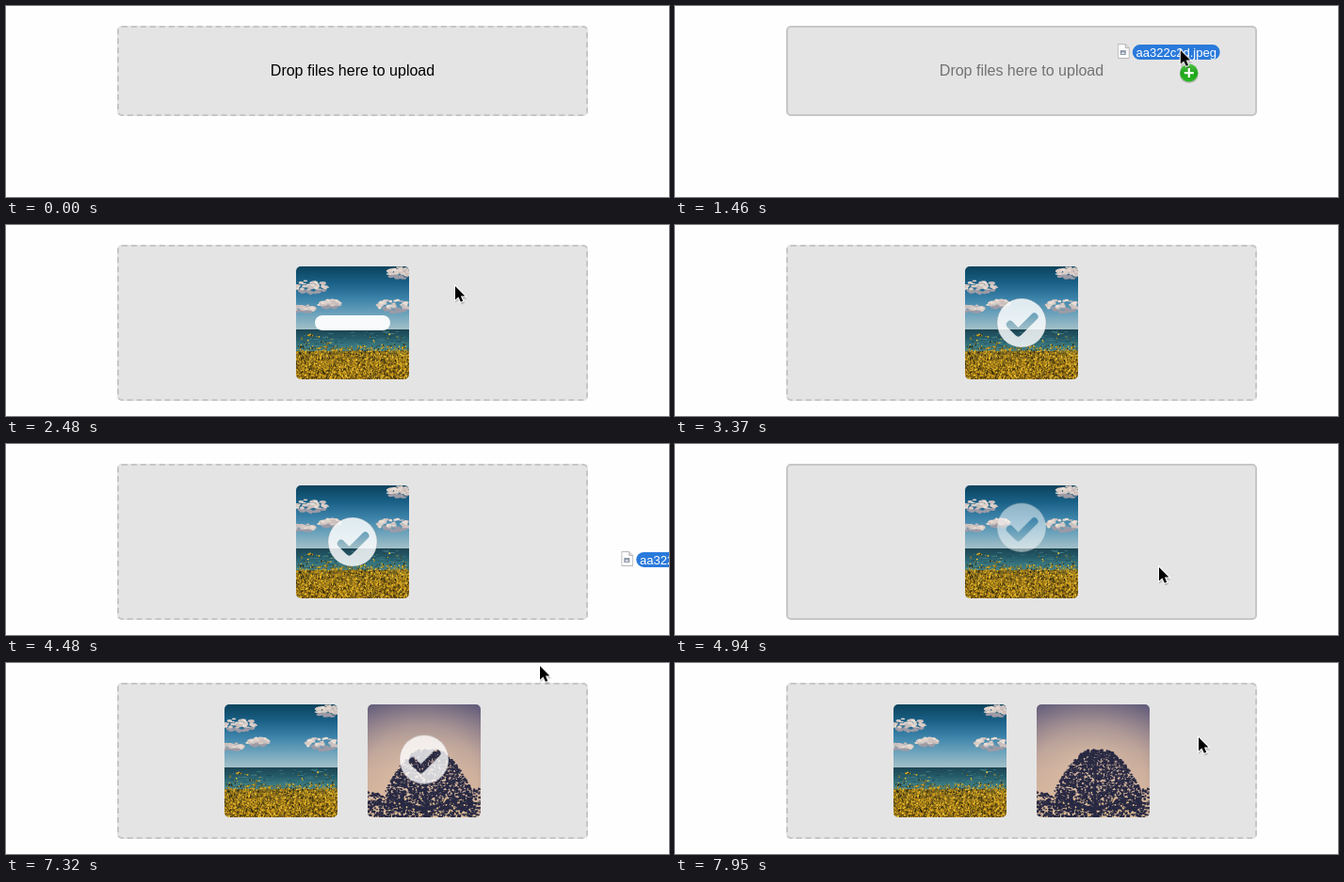
Write an HTML page with a canvas that moves like this. It is 704 px wide and 203 px high and loops after 8 s.

```html
<!DOCTYPE html>
<html lang="en">
<head>
<meta charset="utf-8">
<title>Drop files to upload</title>
<style>
  html, body { margin: 0; width: 100%; height: 100%; overflow: hidden; background: #fefefe; }
  body { position: relative; font-family: "Liberation Sans", Arial, sans-serif; }
  body * { box-sizing: border-box; }
  .zone, .msg, .preview, .photo, .bar, .fill, .mark, .cursor, .drag, .drag > *, .arrow { position: absolute; }
  .zone, .msg, .preview, .fill, .bar, .mark, .cursor, .drag { animation: 8s linear infinite both; }

  .zone {
    left: 118px; top: 21px; width: 500px; height: 96px;
    border: 2px dashed #c6c6c6; border-radius: 5px; background: #e4e4e4;
    animation-name: zone; animation-timing-function: step-end;
  }
  .msg {
    left: 118px; top: 23px; width: 500px; line-height: 92px;
    text-align: center; font-size: 16px; color: #000;
    animation-name: msg; animation-timing-function: step-end;
  }
  .preview { top: 44px; width: 120px; height: 120px; animation-timing-function: step-end; }
  .one { animation-name: first; }
  .two { left: 384px; animation-name: second; }
  .photo { left: 0; top: 0; border-radius: 5px; }
  .bar {
    left: 20px; top: 52px; width: 80px; height: 16px;
    border-radius: 8px; overflow: hidden; background: rgba(255, 255, 255, .95);
  }
  .fill { left: 0; top: 0; height: 16px; background: linear-gradient(#666, #444); }
  .mark { left: 33px; top: 33px; width: 54px; height: 54px; }
  .one .bar { animation-name: barOne; }
  .two .bar { animation-name: barTwo; }
  .one .fill { animation-name: fillOne; }
  .two .fill { animation-name: fillTwo; }
  .mark { animation-timing-function: cubic-bezier(.77, 0, .175, 1); }
  .one .mark { animation-name: markOne; }
  .two .mark { animation-name: markTwo; }

  .cursor { left: 0; top: 0; width: 0; height: 0; animation-name: cursor; }
  .drag { left: 0; top: 0; animation-name: drag; animation-timing-function: step-end; }
  .name {
    left: -50px; top: -6px; width: 93px; height: 16px; border-radius: 8px;
    background: #2a7adb; color: #fff; font-size: 13px; line-height: 18px;
    text-align: center; white-space: nowrap;
  }
  .icon { left: -66px; top: -7px; }
  .badge { left: -1px; top: 13px; }
  .arrow { left: -1px; top: -2px; }

  /* Percentages are milliseconds / 80 */
  @keyframes zone {
    0% { height: 96px; border-style: dashed; }
    16.6% { height: 96px; border-style: solid; }
    27.5% { height: 166px; border-style: dashed; }
    57.75% { height: 166px; border-style: solid; }
    62.375%, 100% { height: 166px; border-style: dashed; }
  }
  @keyframes msg {
    0% { opacity: 1; }
    16.6% { opacity: .5; }
    27.5%, 100% { opacity: 0; }
  }
  @keyframes first {
    0% { left: 308px; opacity: 0; }
    27.5% { left: 308px; opacity: 1; }
    62.375%, 100% { left: 232px; opacity: 1; }
  }
  @keyframes second {
    0% { opacity: 0; }
    62.375%, 100% { opacity: 1; }
  }
  @keyframes barOne {
    0%, 31% { opacity: 1; animation-timing-function: ease-in; }
    36%, 100% { opacity: 0; }
  }
  @keyframes barTwo {
    0%, 63.5% { opacity: 1; animation-timing-function: ease-in; }
    68.5%, 100% { opacity: 0; }
  }
  @keyframes fillOne {
    0%, 30.9% { width: 0; animation-timing-function: ease-in-out; }
    34.65%, 100% { width: 80px; }
  }
  @keyframes fillTwo {
    0%, 63.5% { width: 0; animation-timing-function: ease-in-out; }
    67.25%, 100% { width: 80px; }
  }
  @keyframes markOne {
    0%, 31% { opacity: 0; transform: translateY(40px); }
    42.2%, 56.65% { opacity: 1; transform: none; }
    67.9%, 100% { opacity: 0; transform: translateY(-40px); }
  }
  @keyframes markTwo {
    0%, 63.5% { opacity: 0; transform: translateY(40px); }
    74.75%, 89.3% { opacity: 1; transform: none; }
    99.6%, 100% { opacity: 0; transform: translateY(-40px); }
  }
  @keyframes cursor {
    0%, 15.37% { transform: translate(800px, 17px); }
    15.375% { transform: translate(715px, 17px); }
    18.25% { transform: translate(536px, 47px); animation-timing-function: ease-out; }
    24%, 32% { transform: translate(476px, 65px); animation-timing-function: ease-in; }
    36.62% { transform: translate(648px, 66px); }
    36.625%, 55.2% { transform: translate(800px, 118px); }
    55.25% { transform: translate(765px, 119px); }
    58% { transform: translate(600px, 126px); animation-timing-function: ease-out; }
    60.5%, 66% { transform: translate(513px, 131px); animation-timing-function: ease-in-out; }
    68.75%, 77.625% { transform: translate(526px, 138px); animation-timing-function: ease-in; }
    82.5% { transform: translate(551px, -22px); }
    82.51%, 91.49% { transform: translate(566px, -30px); }
    91.5% { transform: translate(566px, 3px); }
    95% { transform: translate(566px, 48px); animation-timing-function: ease-out; }
    98.75%, 100% { transform: translate(555px, 79px); }
  }
  @keyframes drag {
    0% { opacity: 1; }
    26.625% { opacity: 0; }
    55% { opacity: 1; }
    61.5%, 100% { opacity: 0; }
  }
</style>
</head>
<body>
  <div class="zone"></div>
  <div class="msg">Drop files here to upload</div>

  <div class="preview one">
    <canvas class="photo" id="meadow" width="120" height="120"></canvas>
    <div class="bar"><div class="fill"></div></div>
    <svg class="mark" viewBox="0 0 54 54">
      <mask id="tick">
        <rect width="54" height="54" fill="#fff"/>
        <path d="M14.8 28.8 23.5 37.5 40.5 20.5" fill="none" stroke="#000" stroke-width="8" stroke-linecap="round" stroke-linejoin="round"/>
      </mask>
      <circle id="disc" cx="27" cy="27" r="26" fill="#fff" fill-opacity=".83" stroke="#747474" stroke-opacity=".2" mask="url(#tick)"/>
    </svg>
  </div>

  <div class="preview two">
    <canvas class="photo" id="tree" width="120" height="120"></canvas>
    <div class="bar"><div class="fill"></div></div>
    <svg class="mark" viewBox="0 0 54 54"><use href="#disc"/></svg>
  </div>

  <div class="cursor">
    <div class="drag">
      <svg class="icon" width="13" height="16">
        <path d="M.5 .5H8.5L12.5 4.5V15.5H.5Z" fill="#fbfbfb" stroke="#b5b5b5"/>
        <path d="M8.5 .5V4.5H12.5" fill="#ddd" stroke="#b5b5b5"/>
        <path d="M3 7H9V12H3Z" fill="#8f9aa8"/>
        <path d="M4 11 6 8.5 8 11Z" fill="#e6e9ee"/>
      </svg>
      <div class="name">aa322c2d.jpeg</div>
      <svg class="badge" width="22" height="23">
        <defs>
          <linearGradient id="green" x2="0" y2="1">
            <stop stop-color="#56c14c"/>
            <stop offset=".5" stop-color="#1fa51a"/>
            <stop offset="1" stop-color="#2cb824"/>
          </linearGradient>
        </defs>
        <circle cx="11" cy="12" r="10" fill="#000" opacity=".2"/>
        <circle cx="11" cy="11" r="9.5" fill="url(#green)"/>
        <path d="M11 6V16M6 11H16" stroke="#fff" stroke-width="2.2"/>
      </svg>
    </div>
    <svg class="arrow" width="18" height="24">
      <path d="M2 4V19.5L6 16.5 8.5 21.5 12 20 10 15.5H14.5Z" fill="#000" opacity=".2"/>
      <path d="M2 2V16.5L5.4 13.5 7.9 18.8 10.2 17.8 7.9 12.6H12.4Z" fill="#000" stroke="#fff" stroke-width="2" paint-order="stroke"/>
    </svg>
  </div>

<script>
  let seed = 7;
  const rand = () => (seed = (seed * 16807) % 2147483647) / 2147483647;
  const between = (a, b) => a + rand() * (b - a);
  const pick = list => list[Math.floor(rand() * list.length)];
  const context = id => document.getElementById(id).getContext('2d');

  function gradient(c, y0, y1, colors) {
    const g = c.createLinearGradient(0, y0, 0, y1);
    colors.forEach((color, i) => g.addColorStop(i / (colors.length - 1), color));
    c.fillStyle = g;
    c.fillRect(0, y0, 120, y1 - y0);
  }

  function dot(c, x, y, rx, color, ry = rx) {
    c.fillStyle = color;
    c.beginPath();
    c.ellipse(x, y, rx, ry, 0, 0, 7);
    c.fill();
  }

  // Wide soft puffs, lit from above, on a flat grey base
  function cloud(c, x, y, w, h) {
    for (let i = 0; i < 60; i++) {
      const u = between(-1, 1), v = between(-1, 1) * Math.sqrt(1 - u * u);
      const color = v > .35 ? '#9d9ba6' : pick(['#dccfc8', '#e9ddd4', '#cbbfbd']);
      dot(c, x + u * w * .45, y + v * h * .42, between(1.4, 3.4), color, between(.8, 1.8));
    }
  }

  function paintMeadow() {
    const c = context('meadow');
    gradient(c, 0, 67, ['#0b435c', '#195f85', '#3a81a8', '#6ba2bb', '#a3c0c8']);
    cloud(c, 16, 22, 36, 17);
    cloud(c, 109, 7, 24, 17);
    cloud(c, 36, 40, 24, 10);
    cloud(c, 104, 42, 36, 17);
    cloud(c, 8, 45, 24, 10);
    gradient(c, 67, 94, ['#1c4452', '#245a68', '#3b7a82', '#4a8488']);
    for (let i = 0; i < 90; i++) {
      dot(c, between(0, 120), between(68, 88), between(1, 4), pick(['#1c4656', '#47848a']), .4);
    }

    const flowers = ['#d6a31a', '#e3b325', '#c08d14', '#f2c838', '#94711a', '#4a3d14', '#2b230f'];
    gradient(c, 90, 120, ['#7b6a24', '#8a6a16', '#5c4410']);
    for (let i = 0; i < 2600; i++) {
      const y = 84 + 36 * Math.pow(rand(), .7);
      dot(c, between(0, 120), y, between(.4, .9), pick(flowers), between(.4, 1.2));
    }
    // Taller stalks at both sides
    for (let i = 0; i < 70; i++) {
      const x = i % 2 ? between(2, 38) : between(78, 120);
      dot(c, x, between(72, 88), between(.4, 1), pick(flowers));
    }
  }

  function paintTree() {
    const c = context('tree');
    gradient(c, 0, 120, ['#6c6580', '#97868f', '#b9a098', '#cdae9c', '#d8b79b', '#e2c092']);
    const glow = c.createRadialGradient(58, 78, 10, 58, 78, 95);
    glow.addColorStop(0, 'rgba(232,202,170,.65)');
    glow.addColorStop(.55, 'rgba(205,178,160,.35)');
    glow.addColorStop(1, 'rgba(85,80,115,.4)');
    c.fillStyle = glow;
    c.fillRect(0, 0, 120, 120);

    const dark = '#282943';
    const half = y => 46 * Math.sqrt(Math.min(1, (y - 46) / 46));
    const leaf = (x, y) => dot(c, x, y, between(.6, 2), dark, between(.5, 1.4));
    for (let i = 0; i < 2300; i++) {
      const y = 48 + 64 * Math.pow(rand(), .8);
      leaf(65 + between(-1, 1) * half(y), y);
    }
    // Bushes rising towards both corners
    for (let i = 0; i < 750; i++) {
      const x = between(0, 120);
      const top = x < 60 ? 92 + x * .3 : 112 - (x - 60) * .42;
      leaf(x, between(top, 120));
    }
    for (let i = 0; i < 280; i++) {
      const y = between(60, 119);
      dot(c, 62 + between(-.95, .95) * half(y), y, between(.4, 1.1), y > 100 ? '#e0bd88' : '#cbac9a');
    }
    c.strokeStyle = dark;
    c.lineWidth = 2;
    c.stroke(new Path2D('M61 120 63 60M61 108 38 84M62 104 92 80M61 114 26 100M62 112 104 98'));
  }

  paintMeadow();
  paintTree();
</script>
</body>
</html>
```
